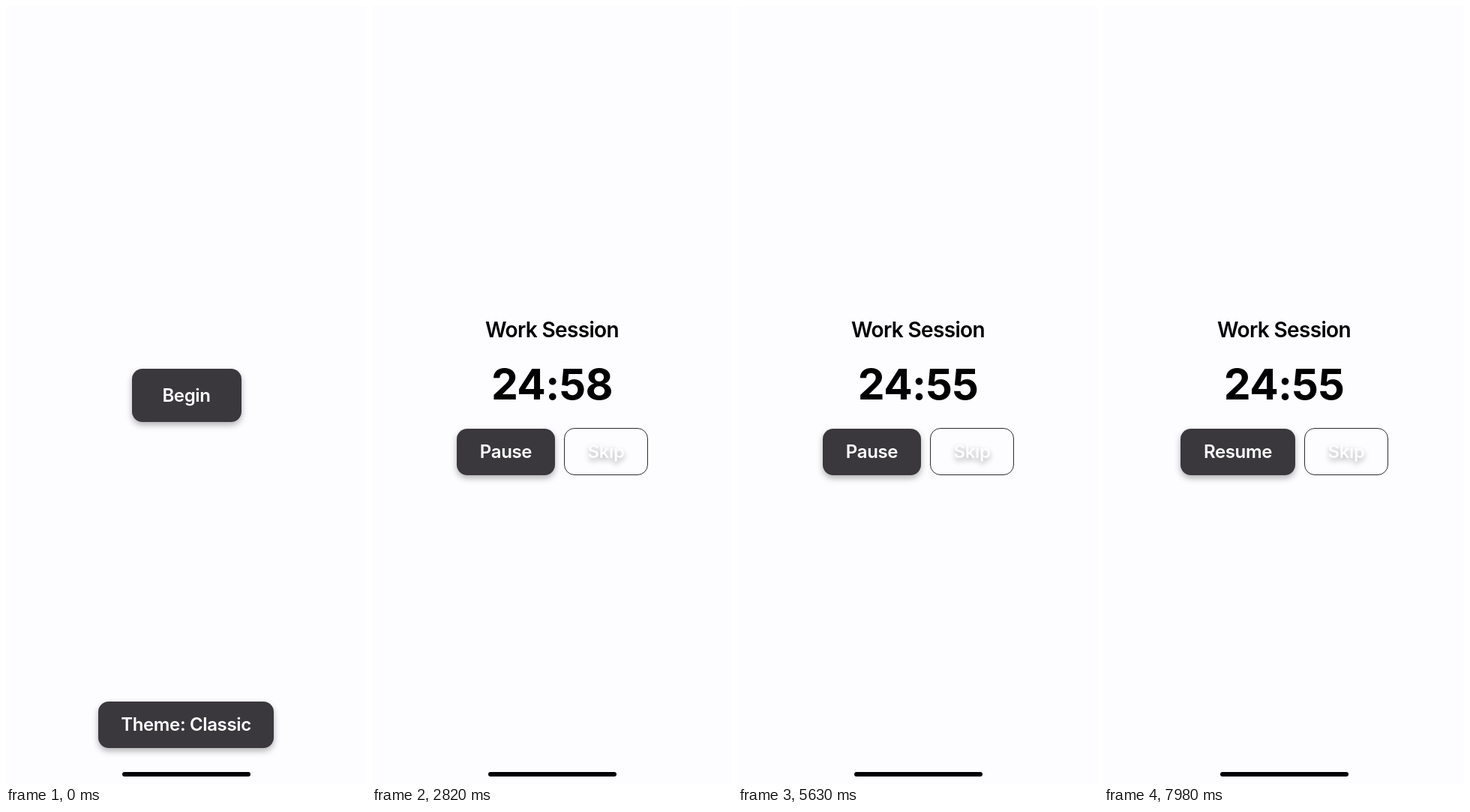
Recreate the animation shown at these times as an HTML page. Size 480 by 1038 pixels, loop 8000 ms.

```html
<!DOCTYPE html>
<html lang="en">
<head>
<meta charset="utf-8">
<title>Work timer</title>
<style>
  html, body { margin: 0; width: 100%; height: 100%; overflow: hidden; background: #fdfcff; }
  #stage { position: relative; width: 480px; height: 1038px; overflow: hidden;
    font: 600 24px/1 Inter, sans-serif; letter-spacing: -.35px; }
  #stage div div { position: absolute; display: flex; align-items: center; justify-content: center;
    box-sizing: border-box; white-space: nowrap; }
  .button { color: #fff; background: #3a383d; border-radius: 14px; box-shadow: 0 4px 8px rgba(0, 0, 0, .3); }
  .outline { color: #fdfcff; border: 1px solid #2c2b2f; border-radius: 14px;
    text-shadow: 0 4px 7px rgba(0, 0, 0, .3); }
  .title, .clock { color: #000; }
  .title { font-size: 28px; letter-spacing: -.65px; }
  .clock { font-size: 57px; font-weight: 700; letter-spacing: -.6px; }
  .bar { background: #000; border-radius: 3px; }
</style>
</head>
<body>
<div id="stage">
  <div id="home"></div>
  <div id="session"></div>
  <div id="always"></div>
</div>
<script>
const LOOP = 8000, START = 1410, TICK = 1410, PAUSE = 5985;
const $ = id => document.getElementById(id);

function place(el, x, y, w, h) {
  Object.assign(el.style, { left: x + 'px', top: y + 'px', width: w + 'px', height: h + 'px' });
}

function add(parent, kind, text, ...box) {
  const el = document.createElement('div');
  el.className = kind;
  el.textContent = text;
  place(el, ...box);
  $(parent).append(el);
  return el;
}

const begin = add('home', 'button', 'Begin', 167.5, 484, 146, 71);
add('home', 'button', 'Theme: Classic', 123, 928, 234, 62);
add('session', 'title', 'Work Session', 0, 412, 480, 40);
const clock = add('session', 'clock', '', 0, 469, 480, 70);
const toggle = add('session', 'button', '', 113, 564, 131, 62);
const skip = add('session', 'outline', 'Skip', 256, 563, 112, 63);
add('always', 'bar', '', 155, 1022, 171, 6);

// Eased progress from a to b
function ramp(t, a, b) {
  const p = Math.min(1, Math.max(0, (t - a) / (b - a)));
  return p * p * (3 - 2 * p);
}

// Dims at once and shrinks while held, then recovers after the release
function press(el, t, down, up) {
  const dim = ramp(t, down, down + 60) - ramp(t, up, up + 160);
  const shrink = ramp(t, down, down + 180) - ramp(t, up + 95, up + 330);
  el.style.opacity = 1 - .5 * dim;
  el.style.transform = `scale(${1 - .053 * shrink})`;
}

function draw(now) {
  const t = now % LOOP, running = t >= START, paused = t >= PAUSE;
  $('home').style.display = running ? 'none' : '';
  $('session').style.display = running ? '' : 'none';
  const left = 1499 - Math.floor((Math.min(t, PAUSE) - TICK) / 1000);
  clock.textContent = `${Math.floor(left / 60)}:${String(left % 60).padStart(2, '0')}`;
  toggle.textContent = paused ? 'Resume' : 'Pause';
  place(toggle, paused ? 102 : 113, 564, paused ? 153 : 131, 62);
  skip.style.left = (paused ? 267 : 256) + 'px';
  press(begin, t, 1200, START);
  press(toggle, t, 5840, PAUSE);
  requestAnimationFrame(draw);
}
draw(performance.now());
</script>
</body>
</html>
```
